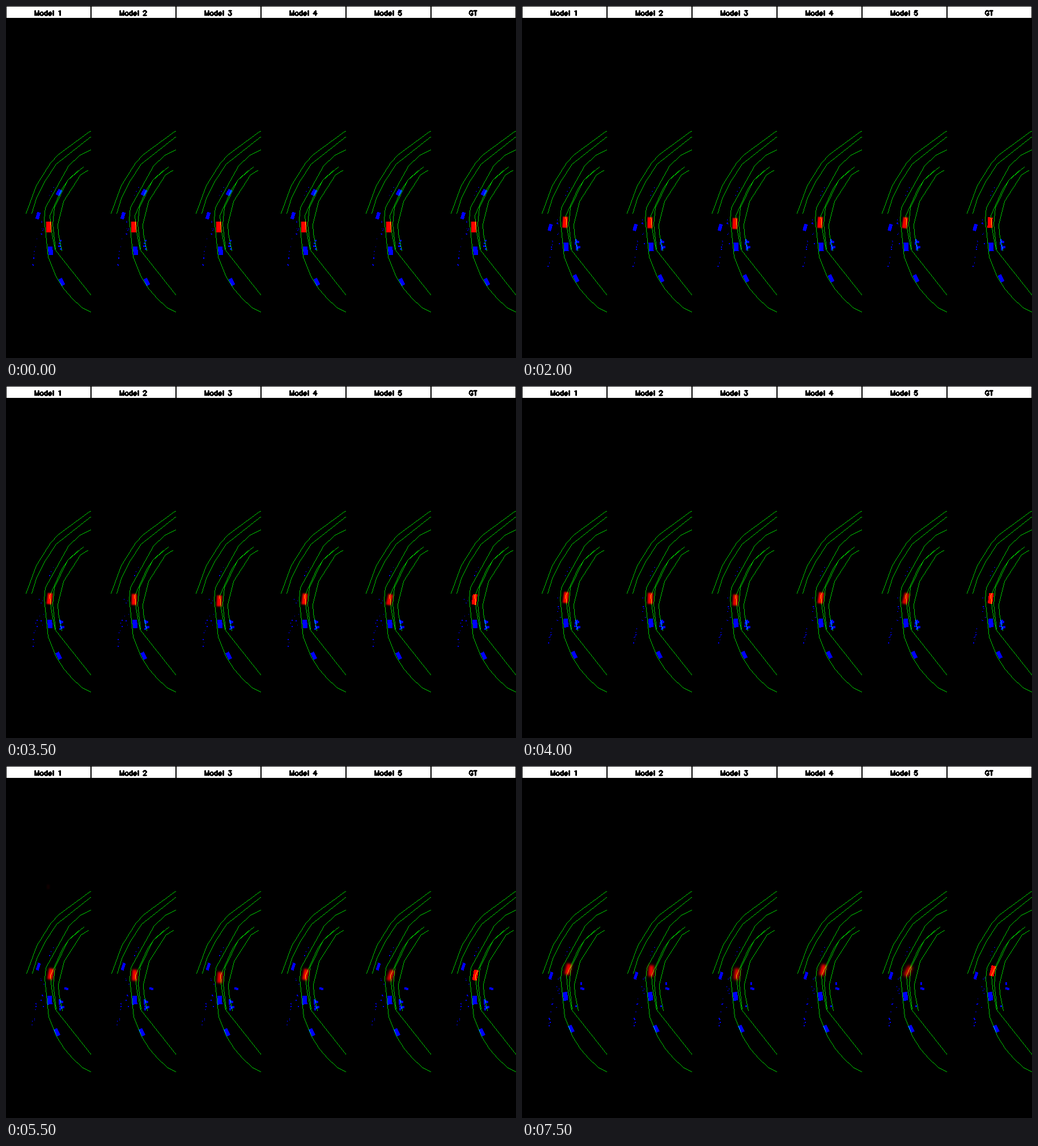
A matplotlib script for the animation above (8000 ms loop, 900 by 622 pixels).

```python
import numpy as np
import matplotlib.pyplot as plt
from matplotlib.animation import FuncAnimation

W, H, TILE, HEAD = 900, 622, 150, 22
FRAMES, INTERVAL = 16, 500
GREEN = .78
YY, XX = np.mgrid[0:H, 0:TILE]

LANES = [
    [(35, 366), (53, 317), (78, 277), (92, 262), (145, 223), (150, 220)],
    [(45, 366), (53, 340), (67, 311), (88, 279), (150, 230)],
    [(150, 253), (129, 264), (110, 282), (69, 356), (67, 376), (74, 443), (88, 478),
     (102, 500), (117, 517), (133, 532), (150, 541)],
    [(136, 284), (109, 307), (98, 323), (77, 370), (79, 392), (86, 430), (150, 511)],
    [(127, 290), (108, 308), (85, 356), (82, 385), (87, 429)],
    [(144, 290), (131, 298), (101, 345), (91, 386), (92, 402), (98, 432)],
]

# Blue boxes: x, y, speed x, speed y, width, height, lean, first and last step
BOXES = [
    (78, 432, -.13, -1.7, 8, 15, -4, 0, 15),
    (98, 487, -.77, -1.55, 6.5, 13, -28, 0, 15),
    (93, 329, 1.3, -2.2, 7, 11, 30, 0, 3),
    (56, 370, -1.7, 5.2, 6, 12, 16, 0, 6),
    (73, 310, -1.5, 4, 5, 13, 17, 10, 15),
    (97, 416, 0, 0, 7, 4, 15, 2, 14),
    (99, 426, 0, 0, 7, 4, -10, 2, 14),
    (106, 393, 0, 0, 7, 4, 12, 10, 15),
    (104, 384, 0, 0, 3, 5, 0, 13, 15),
]

# Forecasts: total shift x and y, final lean, blur, strength; the last is the truth
FORECASTS = [
    (6, -31.5, 14, 1.2, 1),
    (2.6, -28.5, 4, 1.3, 1),
    (3.4, -23, 6, 1.4, .9),
    (5.4, -30, 15, 1.3, 1),
    (5.7, -28, 27, 1.6, .85),
    (5, -28.5, 14, 0, 1),
]


def box_axes(cx, cy, lean):
    """Distance of every pixel from the two axes of a leaning box."""
    a = np.radians(lean)
    dx, dy = XX - cx, YY - cy
    return (abs(dx * np.cos(a) + dy * np.sin(a)),
            abs(dx * np.sin(a) - dy * np.cos(a)))


def hard_box(cx, cy, w, h, lean=0):
    u, v = box_axes(cx, cy, lean)
    return (u <= w / 2 + .1) & (v <= h / 2 + .1)


def soft_box(cx, cy, w, h, lean, blur):
    u, v = box_axes(cx, cy, lean)
    edge = lambda d: 1 / (1 + np.exp(np.clip(d / blur, -40, 40)))
    return edge(u - w / 2) * edge(v - h / 2)


def lane_layer(k):
    layer = np.zeros((H, TILE))
    drift = np.array([.075, .045]) * k
    for lane in LANES:
        pts = np.floor(np.array(lane) + drift + .25).astype(int)
        for p, q in zip(pts[:-1], pts[1:]):
            x, y = np.rint(np.linspace(p, q, abs(q - p).max() + 1)).astype(int).T
            ok = x < TILE
            layer[y[ok], x[ok]] = GREEN
    return layer


def traffic_layer(k):
    layer = np.zeros((H, TILE))
    for x, y, vx, vy, w, h, lean, first, last in BOXES:
        if first <= k <= last:
            layer[hard_box(x + vx * k, y + vy * k, w, h, lean)] = 1

    # Sensor clutter: kerb dots, a sloping column, a middle band, a right cluster
    rng = np.random.default_rng(40 + k)
    dots = [(83 - 3.5 * i, 320 + 7 * i) for i in range(3)]
    for y in rng.uniform(408, 461, 9):
        dots.append((53 - .16 * (y - 420) + rng.normal(), y))
    for y in rng.uniform(373, 428, 7):
        dots.append((63 + 2 * rng.normal(), y))
    for x, y in dots:
        w, h = rng.integers(1, 3, 2)
        layer[int(y):int(y) + h, int(x):int(x) + w] = 1
    for y in (414, 419, 424, 429):
        if k < 15 or y == 424:
            layer[hard_box(94 + rng.integers(3), y, *rng.integers(2, 5, 2))] = 1
    return layer


def forecast_layer(k, dx, dy, lean, blur, strength):
    t = k / (FRAMES - 1)
    pose = 75 + dx * t ** 1.8, 390 + dy * t
    if blur * t == 0:
        return hard_box(*pose, 8, 18.5, lean * t).astype(float)
    shape = soft_box(*pose, 8.6, 19.4, lean * t, .15 + blur * t)
    return shape * (1 - (1 - strength) * t)


def ghost(k):
    """Faint stray detection sliding down the first panel."""
    return .07 * soft_box(74, 202 + 5.5 * (k - 9), 5, 8, 0, .8) if 9 <= k <= 12 else 0


def arc(cx, cy, rx, ry, start, stop):
    a = np.radians(np.linspace(start, stop, 13))
    return list(zip(cx + rx * np.cos(a), cy + ry * np.sin(a)))


BOWL = arc(.5, 2, 6.5, 7, -40, -320)
GLYPHS = {  # advance, pen paths around the centre, y pointing down
    " ": (16, []),
    "M": (24, [[(-8, 9), (-8, -12), (0, 9), (8, -12), (8, 9)]]),
    "o": (19, [arc(.5, 2, 6.5, 7, 0, 360)]),
    "d": (19, [[(6, -12), (6, 9)], BOWL]),
    "e": (18, [[(-6, 1), (6, 1)] + arc(0, 2, 6, 7, -10, -320)]),
    "l": (8, [[(0, -12), (0, 9)]]),
    "1": (20, [[(-4, -8), (-2, -9), (1, -12), (1, 9)]]),
    "2": (20, [arc(0, -7, 6, 5, -180, 30) + [(-7, 9), (7, 9)]]),
    "3": (20, [[(-5, -12), (6, -12), (0, -4)] + arc(0, 2.5, 7, 6.5, -80, 155)]),
    "4": (20, [[(3, 9), (3, -12), (-7, 2), (8, 2)]]),
    "5": (20, [[(5, -12), (-5, -12), (-6, -3)] + arc(0, 2, 7, 7, -130, 155)]),
    "G": (21, [arc(.5, -1.5, 7.5, 10.5, -30, -345) + [(3, 1)]]),
    "T": (16, [[(0, -12), (0, 9)], [(-7, -12), (7, -12)]]),
}


def stroke(img, p, q, radius=1.1):
    """Ink every pixel near the segment from p to q."""
    p, q = np.rint(p), np.rint(q)
    d = q - p
    s = np.clip(((XX - p[0]) * d[0] + (YY - p[1]) * d[1]) / max(d @ d, 1), 0, 1)
    img[np.hypot(XX - p[0] - s * d[0], YY - p[1] - s * d[1]) <= radius] = 0


def header(text, scale=.4, baseline=16):
    img = np.zeros((H, TILE))
    img[1:HEAD - 1, 1:-1] = 1
    width = round(sum(GLYPHS[c][0] for c in text) * scale + 2)
    x = (TILE - width) // 2
    for c in text:
        advance, paths = GLYPHS[c]
        for path in paths:
            pts = np.array(path) * scale + (x + advance * scale / 2, baseline - 9 * scale)
            for p, q in zip(pts[:-1], pts[1:]):
                stroke(img, p, q)
        x += advance * scale
    return img[:HEAD, :, None]


HEADERS = [header(f"Model {i}") for i in range(1, 6)] + [header("GT")]


def scene(k):
    green, blue = lane_layer(k), traffic_layer(k)
    tiles = []
    for i, (title, params) in enumerate(zip(HEADERS, FORECASTS)):
        red = forecast_layer(k, *params) + (ghost(k) if i == 0 else 0)
        tile = np.dstack([red, green, blue])
        tile[:HEAD] = title
        tiles.append(tile)
    return np.clip(np.hstack(tiles), 0, 1)


fig = plt.figure(figsize=(W / 100, H / 100), dpi=100, facecolor="black")
view = fig.figimage(scene(0), origin="upper")


def update(k):
    view.set_data(scene(k))
    return [view]


anim = FuncAnimation(fig, update, frames=FRAMES, interval=INTERVAL, repeat=True,
                     repeat_delay=0, blit=False)
plt.show()
```
